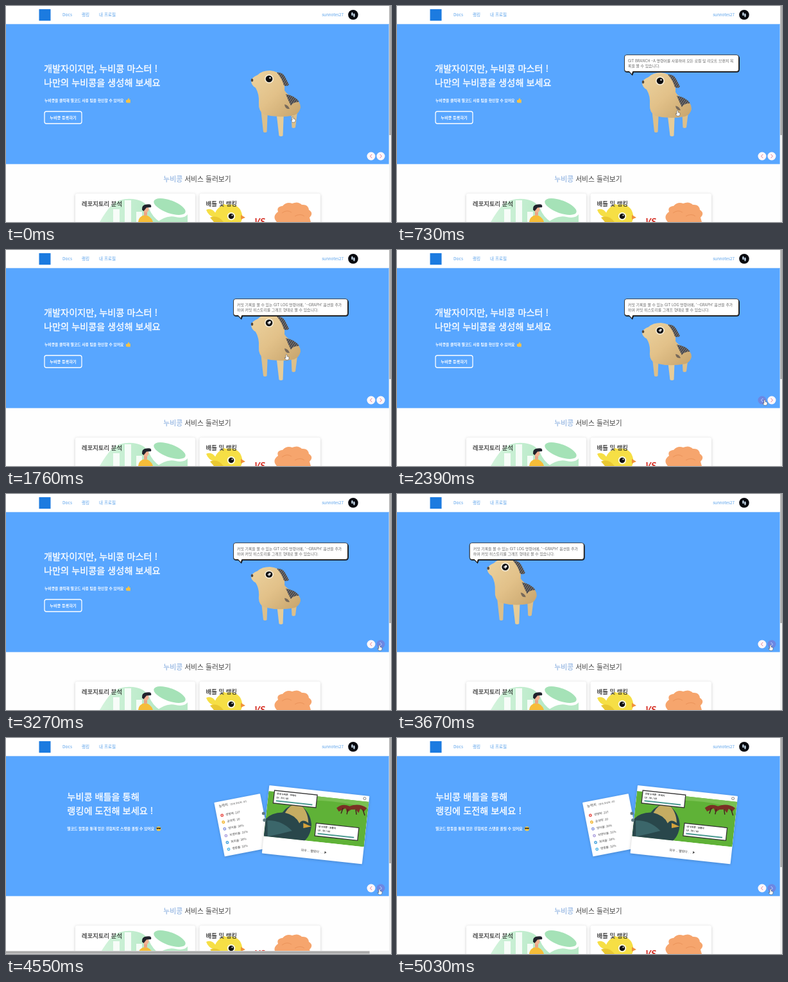
An HTML page for the animation above (5.12 s loop, 600 px wide and 338 px high).

```html
<!DOCTYPE html>
<html lang="ko">
<head>
<meta charset="utf-8">
<style>
html, body { margin: 0; width: 100%; height: 100%; overflow: hidden; background: #fefefe; }
svg { display: block; width: 100vw; height: 100vh; font-family: "Noto Sans CJK KR", "Noto Sans CJK", "Noto Sans", sans-serif; }
.nav { font-size: 6.6px; fill: #58a0ea; }
.head { font-size: 14.2px; fill: #fff; stroke: #fff; stroke-width: .35px; }
.sub { font-size: 5.8px; font-weight: 700; fill: #fff; }
.card { font-size: 9.4px; fill: #222; stroke: #222; stroke-width: .15px; }
.tip { font-size: 5.9px; fill: #666; }
.stat { font-size: 4.6px; fill: #444; }
.tiny { font-size: 3.6px; font-weight: 700; fill: #333; }
.soft { filter: drop-shadow(0 1px 2px #0003); }
</style>
</head>
<body>
<svg viewBox="0 0 600 338" preserveAspectRatio="none">
  <defs>
    <linearGradient id="fur" x2="1" y2="1">
      <stop stop-color="#ecd3a0"/><stop offset=".5" stop-color="#e2c189"/><stop offset="1" stop-color="#c7a46c"/>
    </linearGradient>
    <linearGradient id="leaf" x2="1" y2="0">
      <stop stop-color="#d3f3dc"/><stop offset="1" stop-color="#b4e8c4"/>
    </linearGradient>
    <pattern id="hatch" width="3" height="3" patternUnits="userSpaceOnUse" patternTransform="rotate(35)">
      <rect width="3" height="3" fill="#46454a"/><rect width="1" height="3" fill="#85817c"/>
    </pattern>
    <clipPath id="hero"><rect y="28" width="596.700" height="219.400"/></clipPath>
    <clipPath id="scene"><rect width="157" height="80"/></clipPath>
  </defs>

  <rect width="600" height="338" fill="#fefefe"/>
  <rect y="28" width="596.700" height="219.400" fill="#58a6ff"/>

  <g clip-path="url(#hero)">
    <g id="first">
      <text class="head" x="59" y="103">개발자이지만, 누비콩 마스터 !</text>
      <text class="head" x="59" y="125">나만의 누비콩을 생성해 보세요</text>
      <text class="sub" x="60" y="150">누비콩을 클릭해 별코드 사용 팁을 확인할 수 있어요</text>
      <path d="M187 147h2l2-3q1.500 0 .8 2.500h2v5h-5l-1.800-.8z" fill="#f6c244"/>
      <rect x="60" y="165" width="58" height="19" rx="3" fill="none" stroke="#fff" stroke-width="1.300"/>
      <text class="sub" x="89" y="176.600" text-anchor="middle" style="font-size:6.200px">누비콩 등록하기</text>

      <g fill="#dcbf8a">
        <path d="M397 160h11l-1.500 37q-3 2-5.500 0z"/>
        <path d="M444 158h11l-4 32q-3 2-5.500 0z"/>
        <path d="M421 164h12l-1.500 39q-3 2-6 0z" fill="#e6cc98"/>
      </g>
      <g id="dog">
        <path d="M382 117Q384 111 392 108Q399 101 411 101Q425 102 430 111Q435 121 434 132Q438 139 447 142Q459 148 459 159Q457 168 449 171Q425 176 403 170Q393 165 394 152Q395 138 389 128Q382 124 382 117Z" fill="url(#fur)"/>
        <path d="M422 104Q431 103 435 111L441 123Q438 127 433 124Q430 113 422 104Z" fill="url(#hatch)"/>
        <path d="M436 138Q450 140 457 150Q447 150 444 156Q440 148 436 138Z" fill="url(#hatch)"/>
        <path d="M434 154Q440 155 442 161Q435 162 434 154Z" fill="#77695a"/>
        <ellipse cx="383.500" cy="116" rx="1.800" ry="2.500" fill="#55483c"/>
        <circle cx="410" cy="114" r="7" fill="#f6ecd6"/>
        <circle cx="410" cy="114" r="5.300" fill="#0c0c0e"/>
        <circle cx="411.500" cy="112.500" r="1.200" fill="#fff"/>
        <path id="glint" d="M407.500 114h5M410 111.500v5" stroke="#fff" stroke-width="1.300"/>
      </g>

      <g id="bubble">
        <path d="M358 77H529Q534 77 534 82V99Q534 104 529 104H369L367 109L362 104H359Q354 104 354 99V81Q354 77 358 77Z" fill="#111"/>
        <path d="M358 76.500H529Q532.500 76.500 532.500 80V99Q532.500 102.500 529 102.500H367.500L366 107L362 102.500H358Q354.500 102.500 354.500 99V80Q354.500 76.500 358 76.500Z" fill="#fff" stroke="#222" stroke-width=".8"/>
        <text class="tip" id="tip1" x="360" y="88"></text>
        <text class="tip" id="tip2" x="360" y="95.500"></text>
      </g>
    </g>

    <g id="second">
      <text class="head" x="60" y="96.500">누비콩 배틀을 통해</text>
      <text class="head" x="60" y="119">랭킹에 도전해 보세요 !</text>
      <text class="sub" x="60" y="144">별코드 활동을 통해 얻은 경험치로 스탯을 올릴 수 있어요</text>
      <circle cx="202.500" cy="142" r="3.600" fill="#f8cb45"/>
      <path d="M199 140.500h7l-.8 2h-2l-.7-1-.7 1h-2z" fill="#222"/>

      <g transform="translate(289 101) rotate(-11)">
        <rect class="soft" width="73" height="86" rx="1" fill="#fff"/>
        <text class="stat" x="6" y="9" style="font-size:5.300px">능력치</text>
        <text class="stat" x="24" y="9" style="font-size:3.600px">(잔여 포인트: 47)</text>
        <g id="stats"></g>
      </g>

      <g transform="translate(375 74) rotate(6.200)">
        <rect class="soft" width="157" height="107" rx="1" fill="#fff"/>
        <g clip-path="url(#scene)">
          <rect y="9" width="157" height="71" fill="#5fb237"/>
          <path d="M70 9H157V20Q120 12 70 16Z" fill="#79c152"/>
          <path d="M0 84V53Q8 42 25 40Q34 24 51 26Q68 34 72 54Q73 74 60 84Z" fill="#29474b"/>
          <path d="M29 40Q37 22 51 25Q64 33 67 52Q57 46 53 54Q46 42 29 40Z" fill="#c5ac62"/>
          <path d="M3 55Q25 52 43 67Q25 74 6 80Z" fill="#3b666a"/>
          <path d="M59 53l13 4-12 4z" fill="#d6a23b"/>
          <path d="M108 24Q116 15 128 19Q142 12 155 19L151 25L145 21L143 28L138 23L131 24L125 29L122 23L112 29Z" fill="#7a3024"/>
          <path d="M118 23l-2 9M126 24l-1 8M138 23l2 8M149 22l4 9" stroke="#43251f" stroke-width="1.500"/>
        </g>
        <g id="plates"></g>
        <circle cx="150" cy="4.500" r="2" fill="none" stroke="#555" stroke-width=".7"/>
        <text class="stat" x="60" y="97" style="font-size:5px">와우 .. 빨랐다 . . .</text>
        <path d="M97 93l3 2-3 2z" fill="#444"/>
      </g>
      <g fill="#617a83"><circle cx="366" cy="118" r="2.500"/><circle cx="367.500" cy="128.500" r="2.500"/></g>
    </g>
  </g>

  <rect y="28" width="596.700" height="1" fill="#8fc1fb"/>
  <rect width="600" height="28" fill="#fff"/>
  <rect x="51.500" y="5" width="18" height="18" fill="#1c7be0"/>
  <text class="nav" x="88" y="16.400">Docs</text>
  <text class="nav" x="118" y="16.400">랭킹</text>
  <text class="nav" x="145" y="16.400">내 프로필</text>
  <text class="nav" x="526" y="16.200" text-anchor="end" style="font-size:6.300px">sunnotes27</text>
  <circle cx="541" cy="13.700" r="7.800" fill="#07090f"/>
  <g fill="#c9dcec"><ellipse cx="539.500" cy="12.500" rx="1.300" ry="2.800"/><ellipse cx="542.500" cy="14.500" rx="1.300" ry="3"/></g>

  <text x="298" y="274.700" text-anchor="middle" font-size="10.800" fill="#444"><tspan fill="#7ba5dc">누비콩</tspan> 서비스 둘러보기</text>
  <rect class="soft" x="108" y="293.500" width="187" height="60" rx="3" fill="#fff"/>
  <rect class="soft" x="301.500" y="293.500" width="188.500" height="60" rx="3" fill="#fff"/>

  <path d="M146 338Q155 322 165 311Q178 300 198 302Q216 304 223 317Q228 330 240 338Z" fill="url(#leaf)"/>
  <ellipse cx="255" cy="314" rx="26" ry="10" fill="#a5e2b7" transform="rotate(20 255 314)"/>
  <path d="M236 338Q250 327 264 330T283 326V338Z" fill="#b9e9c7"/>
  <g fill="#fff" opacity=".85"><rect x="167" y="318" width="10" height="20"/><rect x="185" y="304" width="10" height="34"/><rect x="203" y="322" width="9" height="16"/></g>
  <path d="M206 338Q207 329 216 327Q226 328 229 338Z" fill="#f6bd38"/>
  <path d="M215 322h5v5q-2.500 3-5 0z" fill="#eda583"/>
  <circle cx="218" cy="318.500" r="4.500" fill="#f3b292"/>
  <path d="M212 319Q211 311 219 310.500Q228 309 226 315L219 315.500L214.500 321Z" fill="#20232c"/>
  <text class="card" x="118" y="312.700">레포지토리 분석</text>

  <g fill="#f6df45">
    <path d="M312 319Q321 315 327 325L325 331Q315 328 312 319Z"/>
    <path d="M324 342Q322 318 338 312Q338 308 342 311Q362 308 367 323Q371 334 363 342Z"/>
    <path d="M318 331Q330 326 339 338H324Z" fill="#e9c832"/>
    <path d="M366 327l7 4-7 3z" fill="#f0913a"/>
  </g>
  <circle cx="351" cy="329" r="6.200" fill="#fffbe0"/><circle cx="351" cy="329" r="4.300" fill="#111"/><circle cx="352.500" cy="327.500" r="1" fill="#fff"/>
  <text x="386" y="341.500" font-size="13.500" font-weight="900" font-style="italic" fill="#d8392f">VS</text>
  <path d="M422 338Q414 329 424 322Q421 314 431 313Q437 306 446 309Q455 305 461 311Q471 310 472 319Q480 324 473 331L475 338Z" fill="#f6a56d"/>
  <path d="M430 324q8-6 15-1m5 6q9-5 15 0" fill="none" stroke="#eb935a"/>
  <text class="card" x="311.500" y="312.700">배틀 및 랭킹</text>

  <g id="arrows"></g>
  <rect x="597" width="3" height="338" fill="#f1f1f1"/>
  <rect id="vbar" x="597.300" width="2.700" height="202" fill="#adadad"/>
  <g id="hscroll"><rect y="333" width="600" height="5" fill="#f1f1f1"/><rect id="hbar" y="333.500" width="300" height="4" fill="#a9a9a9"/></g>
  <path id="cursor" d="M-1 0Q0-1.500 1 0V2.500L4 3.300V6L3 8H-1L-3 4.500L-1 5Z" fill="#fff" stroke="#444" stroke-width=".5"/>
</svg>
<script>
const LOOP = 5120;
const $ = id => document.getElementById(id);
const show = (id, on) => $(id).setAttribute('visibility', on ? 'visible' : 'hidden');
const move = (id, x, y = 0) => $(id).setAttribute('transform', `translate(${x} ${y})`);
const progress = (t, from, to) => Math.min(1, Math.max(0, (t - from) / (to - from)));
const smooth = p => p * p * (3 - 2 * p);

const stats = [['생명력: 237', '#e9534d'], ['공격력: 20', '#f2b632'], ['방어율: 30%', '#8d9be0'],
  ['치명타율: 31%', '#b0a4df'], ['회피율: 30%', '#4fa8df'], ['명중률: 32%', '#5bbbe8']];
$('stats').innerHTML = stats.map(([label, color], i) => {
  const y = 22 + i * 10.8;
  return `<circle cx="8.300" cy="${y}" r="2.400" fill="${color}"/><circle cx="8.300" cy="${y}" r=".9" fill="#fff"/>
    <text class="stat" x="14" y="${y + 1.7}">${label}</text>`;
}).join('');

const plate = (x, y, label) => `<g transform="translate(${x} ${y})">
  <rect width="67" height="20" fill="#fff" stroke="#333" stroke-width="1.300"/>
  <text class="tiny" x="4" y="6">${label}</text><text class="tiny" x="4" y="12">LV . 50 / 60</text>
  <rect x="4" y="15" width="57" height="2" fill="#4b9a91"/></g>`;
$('plates').innerHTML = plate(9, 7, '상대 누비콩 : 무럭이') + plate(79, 51, '내 누비콩 : 보들이');

const arrows = [[569, 1], [584, -1]];
$('arrows').innerHTML = arrows.map(([x, side], i) => `<circle id="disc${i}" cx="${x}" cy="235" r="6.500"/>
  <path id="chev${i}" d="M${x + 1.3 * side} 232l${-2.8 * side} 3l${2.8 * side} 3" fill="none" stroke-width="1"/>`).join('');

const tips = [
  ['GIT BRANCH –A 명령어를 사용하여 모든 로컬 및 리모트 브랜치 목', '록을 볼 수 있습니다.'],
  ["커밋 기록을 볼 수 있는 GIT LOG 명령어에, '--GRAPH' 옵션을 추가", '하여 커밋 히스토리를 그래프 형태로 볼 수 있습니다.']
];

// Each stop: start, end, x, y
const stops = [[100, 400, 437, 164], [1850, 2300, 573, 235], [2750, 3100, 582, 237]];
function cursorAt(t) {
  let x = 447, y = 174;
  for (const [from, to, nx, ny] of stops) {
    const p = smooth(progress(t, from, to));
    x += (nx - x) * p;
    y += (ny - y) * p;
  }
  return [x, y];
}

function bobAt(t) {
  const phase = t < 1760 ? t / 880 : t < 2390 ? 2 + (t - 1760) / 1260 : 2.5 + (t - 2390) / 880;
  return 6 * (1 - Math.cos(2 * Math.PI * phase));
}

function draw(t) {
  const bob = bobAt(t);
  $('dog').setAttribute('transform', `matrix(1 0 0 ${1 - .0069 * bob} 0 ${1.786 * bob})`);

  const second = t >= 1300;
  show('bubble', t >= 550);
  show('glint', second);
  [$('tip1').textContent, $('tip2').textContent] = tips[+second];

  const leave = progress(t, 3380, 4050);
  const enter = 600 * (1 - progress(t, 4160, 4800)) ** 3;
  move('first', -600 * smooth(leave));
  move('second', enter);
  const wide = leave === 1 && enter > 1;
  show('hscroll', wide);
  $('hbar').setAttribute('width', 360000 / (600 + enter));
  $('vbar').setAttribute('height', wide ? 196 : 202);

  const [x, y] = cursorAt(t);
  move('cursor', x, y);
  arrows.forEach(([ax], i) => {
    const hover = y > 225 && Math.abs(x - ax) < 7;
    $('disc' + i).setAttribute('fill', hover ? '#6c87e2' : '#fff7fa');
    $('chev' + i).setAttribute('stroke', hover ? '#c6d4fb' : '#d98296');
  });
}

function tick() {
  draw(performance.now() % LOOP);
  requestAnimationFrame(tick);
}
tick();
</script>
</body>
</html>
```
